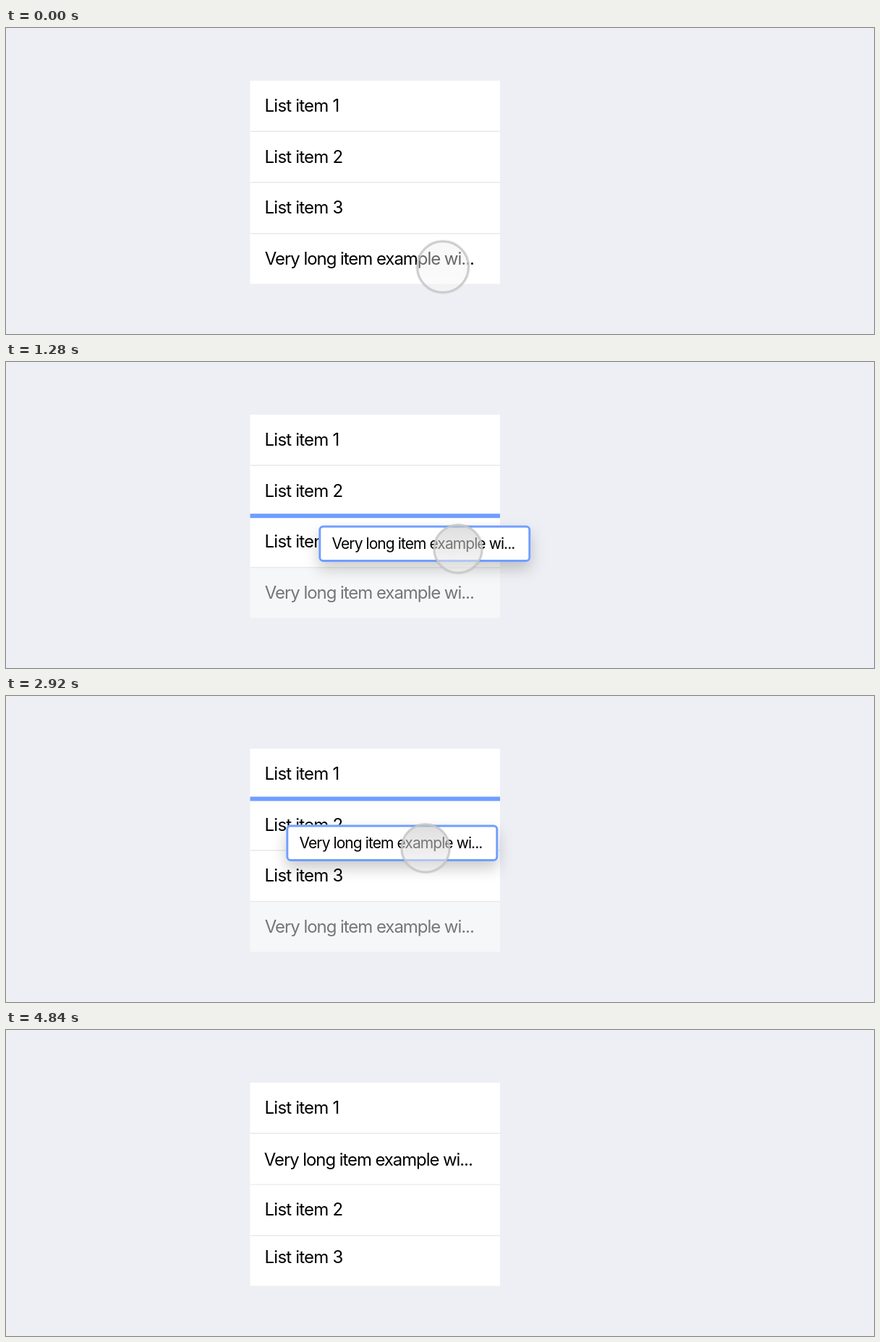
Recreate the animation shown at these times as an HTML page. Size 1200 by 424 pixels, loop 5440 ms.

```html
<!DOCTYPE html>
<html lang="en">
<head>
<meta charset="utf-8">
<title>Drag and drop list</title>
<style>
  html, body { margin: 0; width: 100%; height: 100%; overflow: hidden; background: #eeeff4; }
  svg { display: block; width: 100%; height: 100%; }
  text {
    font: 400 24px Inter, "Noto Sans", sans-serif;
    font-optical-sizing: none;
    letter-spacing: -.8px;
  }
  .long { letter-spacing: -1.05px; }
  .divider { stroke: #e9e9eb; stroke-width: 1.5; }
</style>
</head>
<body>
<svg viewBox="0 0 1200 424">
  <defs>
    <linearGradient id="glass" x2="0" y2="1">
      <stop stop-color="#ececec" stop-opacity=".38"/>
      <stop offset="1" stop-color="#f8f8f8" stop-opacity=".5"/>
    </linearGradient>
    <linearGradient id="shade" x2="0" y2="1">
      <stop stop-color="#a0a0a0" stop-opacity=".3"/>
      <stop offset="1" stop-color="#c8c8c8" stop-opacity=".08"/>
    </linearGradient>
    <filter id="lift" x="-30%" y="-80%" width="160%" height="300%">
      <feDropShadow id="shadow" dx="0" flood-color="#000"/>
    </filter>
  </defs>

  <rect x="337.5" y="73" width="345.5" height="211.5" fill="#fff"/>
  <g id="lastRow">
    <rect x="337.5" y="284.5" width="345.5" height="70" fill="#fff"/>
    <text id="longItem" class="long" x="357.7" y="328">Very long item example wi...</text>
  </g>
  <path class="divider" d="M337.5 143.3h345.5m-345.5 70.7h345.5m-345.5 70.7h345.5"/>
  <text x="357.6" y="116">List item 1</text>
  <text id="item2" x="357.6">List item 2</text>
  <text id="item3" x="357.6">List item 3</text>

  <rect id="marker" x="337.5" width="345.5" height="6" fill="#709eff"/>

  <g id="card">
    <rect id="cardBox" fill="#fff" filter="url(#lift)"/>
    <rect id="cardEdge" fill="none"/>
    <text id="cardText" class="long">Very long item example wi...</text>
  </g>

  <g id="cursor">
    <circle r="37" fill="none" stroke="#000" stroke-opacity=".06" stroke-width="2"/>
    <circle r="35.5" fill="url(#glass)"/>
    <circle id="cursorShade" r="35.5" fill="url(#shade)"/>
    <circle r="35.3" fill="none" stroke="#c6c6c6" stroke-opacity=".85" stroke-width="3"/>
  </g>
</svg>
<script>
const LOOP = 5440, STEP = 40;
const PICK = 280, DROP = 3640, LEAVE = 4840;
const ROW = 70.7;

// time, x, y of the pointer
const path = [
  [0, 604, 331], [280, 604, 331], [480, 626, 363], [640, 631, 378], [840, 632, 380],
  [960, 631, 366], [1120, 628, 305], [1280, 625, 259], [1400, 619, 243],
  [1600, 612, 205], [1800, 609, 189], [1960, 602, 174], [2200, 597, 178],
  [2440, 592, 189], [2520, 585, 192], [2920, 580, 211], [3080, 578, 214],
  [3200, 575, 208], [3400, 571, 169.5], [3640, 562, 159], [4720, 562, 160],
  [4760, 650, 100], [4800, 789, 36], [4840, 900, -60]
];

const $ = id => document.getElementById(id);
const clamp = v => Math.max(0, Math.min(1, v));
const mix = (a, b, k) => a + (b - a) * k;
const show = (id, on) => $(id).setAttribute('visibility', on ? 'visible' : 'hidden');
const set = (id, attrs) => {
  for (const name in attrs) $(id).setAttribute(name, attrs[name]);
};

const slope = (i, axis) => (path[i + 1][axis] - path[i][axis]) / (path[i + 1][0] - path[i][0]);

// harmonic mean keeps the curve free of overshoot
function tangent(i, axis) {
  if (i === 0 || i === path.length - 1) return 0;
  const a = slope(i - 1, axis), b = slope(i, axis);
  return a * b > 0 ? 2 * a * b / (a + b) : 0;
}

function pointer(t, axis) {
  let i = 0;
  while (i < path.length - 2 && t >= path[i + 1][0]) i++;
  const a = path[i], b = path[i + 1], span = b[0] - a[0];
  const k = clamp((t - a[0]) / span), q = k * k * (3 - 2 * k);
  return mix(a[axis], b[axis], q)
    + span * k * (1 - k) * ((1 - k) * tangent(i, axis) - k * tangent(i + 1, axis));
}

function drawCard(x, y, lifted, dropped, overList) {
  const size = lifted * (1 - dropped);
  const w = mix(345.5, 293, size), h = mix(69.2, 50.5, size);
  const left = mix(x - mix(266.5, 192.7, lifted), 337.5, dropped);
  const top = mix(y - mix(49.5, 32.4, lifted), 144.2, dropped);
  const edge = overList ? 3 : 2;
  const radius = (overList ? 6 : 4) * (1 - dropped);
  const scale = mix(dropped ? .997 : 1, .875, size);
  const textX = left + mix(dropped ? 19.3 : 20.2, 18.2, size);
  const textY = top + h / 2 + mix(9.2, 7.4, size);

  set('cardBox', { x: left, y: top, width: w, height: h, rx: radius });
  set('cardEdge', {
    x: left + edge / 2, y: top + edge / 2, width: w - edge, height: h - edge,
    rx: Math.max(0, radius - edge / 2), 'stroke-width': edge,
    stroke: overList ? '#709eff' : '#3c5a9a', opacity: 1 - dropped
  });
  set('shadow', { dy: 10 * size, stdDeviation: 2 + 8 * size, 'flood-opacity': .2 * size });
  set('cardText', { transform: `translate(${textX} ${textY}) scale(${scale})` });
}

function draw(t) {
  const x = pointer(t, 1), y = pointer(t, 2);
  const dragging = t > PICK && t <= DROP;
  const lifted = clamp((t - PICK) / 315);
  const dropped = 1 - (1 - clamp((t - DROP) / 400)) ** 3;
  const pressed = clamp(t / 80) - clamp((t - DROP) / 80);
  const overList = y < 284.5;

  set('lastRow', { opacity: dragging ? .5 : 1 });
  show('longItem', t <= DROP);
  set('item2', { y: 186.7 + ROW * dropped });
  set('item3', { y: 257.4 + (ROW - 4.7) * dropped });

  show('marker', dragging && overList);
  set('marker', { y: y > 212 ? 210.2 : 139.5 });

  show('card', t > PICK);
  if (t > PICK) drawCard(x, y, lifted, dropped, overList);

  show('cursor', t < LEAVE);
  set('cursor', { transform: `translate(${x} ${y}) scale(${1 - .065 * pressed})` });
  set('cursorShade', { opacity: pressed });
}

function tick() {
  const t = performance.now() % LOOP;
  draw(Math.floor(t / STEP) * STEP);
  requestAnimationFrame(tick);
}
tick();
</script>
</body>
</html>
```
